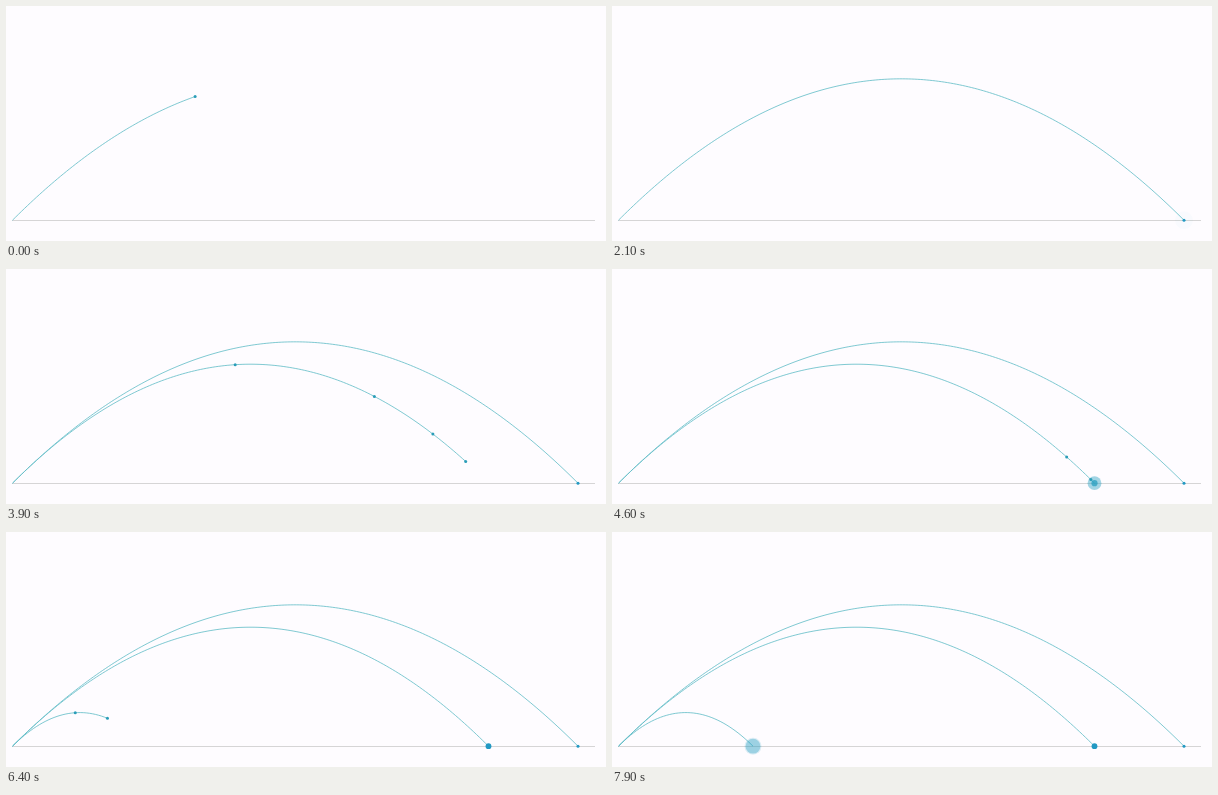
Animation of 600 by 235 pixels, one loop 8000 ms. Source, as an HTML page with a canvas:

```html
<!DOCTYPE html>
<html lang="en">
<head>
<meta charset="utf-8">
<title>Trajectories</title>
<style>
  html, body { margin: 0; width: 100%; height: 100%; overflow: hidden; background: #fefcff; }
  canvas { display: block; width: 600px; height: 235px; }
</style>
</head>
<body>
<canvas id="stage"></canvas>
<script>
const LOOP = 8000, STEP = 100;
const FLIGHT = 1650, RIPPLE = 1000, DISC_DELAY = 350, DISC_GROW = 400;
const X0 = 6.5, Y0 = 214.2;
const BACK = '#fefcff', GROUND = '#d6d5d6';
const LINE = '#5fbcc6', DOT = '#2a9db8', DISC = '#2299c3', WAVE = '36,158,192';

// Each arc: horizontal range, launch times of its dots, final disc radius
const arcs = [
  { range: 565.5, starts: [-350], disc: 1.5 },
  { range: 476, starts: [2700, 2915, 3140, 3442], disc: 2.9 },
  { range: 134.5, starts: [5712, 5943], disc: 2 }
];

const canvas = document.getElementById('stage');
const ctx = canvas.getContext('2d');
const ratio = window.devicePixelRatio || 1;
canvas.width = 600 * ratio;
canvas.height = 235 * ratio;

const clamp = v => Math.min(1, Math.max(0, v));

// cubic-bezier(.25, .1, .25, 1)
function ease(t) {
  if (t <= 0 || t >= 1) return clamp(t);
  let lo = 0, hi = 1;
  for (let i = 0; i < 24; i++) {
    const s = (lo + hi) / 2;
    if (0.75 * s * (1 - s) + s ** 3 < t) lo = s; else hi = s;
  }
  const s = lo, r = 1 - s;
  return 0.3 * s * r * r + 3 * s * s * r + s ** 3;
}

// Launch at 45 degrees: height follows from the range
function point(range, p) {
  return [X0 + range * p, Y0 - range * p * (1 - p)];
}

function circle([x, y], r, fill) {
  ctx.beginPath();
  ctx.arc(x, y, r, 0, Math.PI * 2);
  ctx.fillStyle = fill;
  ctx.fill();
}

function drawPath(range, p) {
  if (p <= 0) return;
  const pieces = Math.ceil(range * p / 3);
  ctx.beginPath();
  for (let i = 0; i <= pieces; i++) ctx.lineTo(...point(range, p * i / pieces));
  ctx.strokeStyle = LINE;
  ctx.lineWidth = 0.8;
  ctx.stroke();
}

function drawRipple(at, age) {
  const t = age / RIPPLE;
  if (t < 0 || t >= 1) return;
  const r = 2 + 7 * (1 - 2 ** (-7 * t));
  circle(at, r, `rgba(${WAVE},${0.8 * (1 - t) ** 2.2})`);
}

function drawArc({ range, starts, disc }, time) {
  const end = point(range, 1);
  drawPath(range, ease((time - starts[0]) / FLIGHT));
  for (const start of starts) {
    const t = (time - start) / FLIGHT;
    drawRipple(end, time - start - FLIGHT);
    if (t > 0 && t < 1) circle(point(range, ease(t)), 1.5, DOT);
  }
  const settled = time - starts[starts.length - 1] - FLIGHT - DISC_DELAY;
  if (settled > 0) {
    const grow = settled >= DISC_GROW ? 1 : 1 - 2 ** (-10 * settled / DISC_GROW);
    circle(end, disc * grow, DISC);
  }
}

function draw(time) {
  ctx.setTransform(ratio, 0, 0, ratio, 0, 0);
  ctx.fillStyle = BACK;
  ctx.fillRect(0, 0, 600, 235);
  ctx.fillStyle = GROUND;
  ctx.fillRect(6, 214, 583, 1);
  for (const arc of arcs) drawArc(arc, time);
}

const begin = performance.now();
function tick() {
  const time = (performance.now() - begin) % LOOP;
  draw(Math.floor(time / STEP) * STEP);
  requestAnimationFrame(tick);
}
tick();
</script>
</body>
</html>
```
